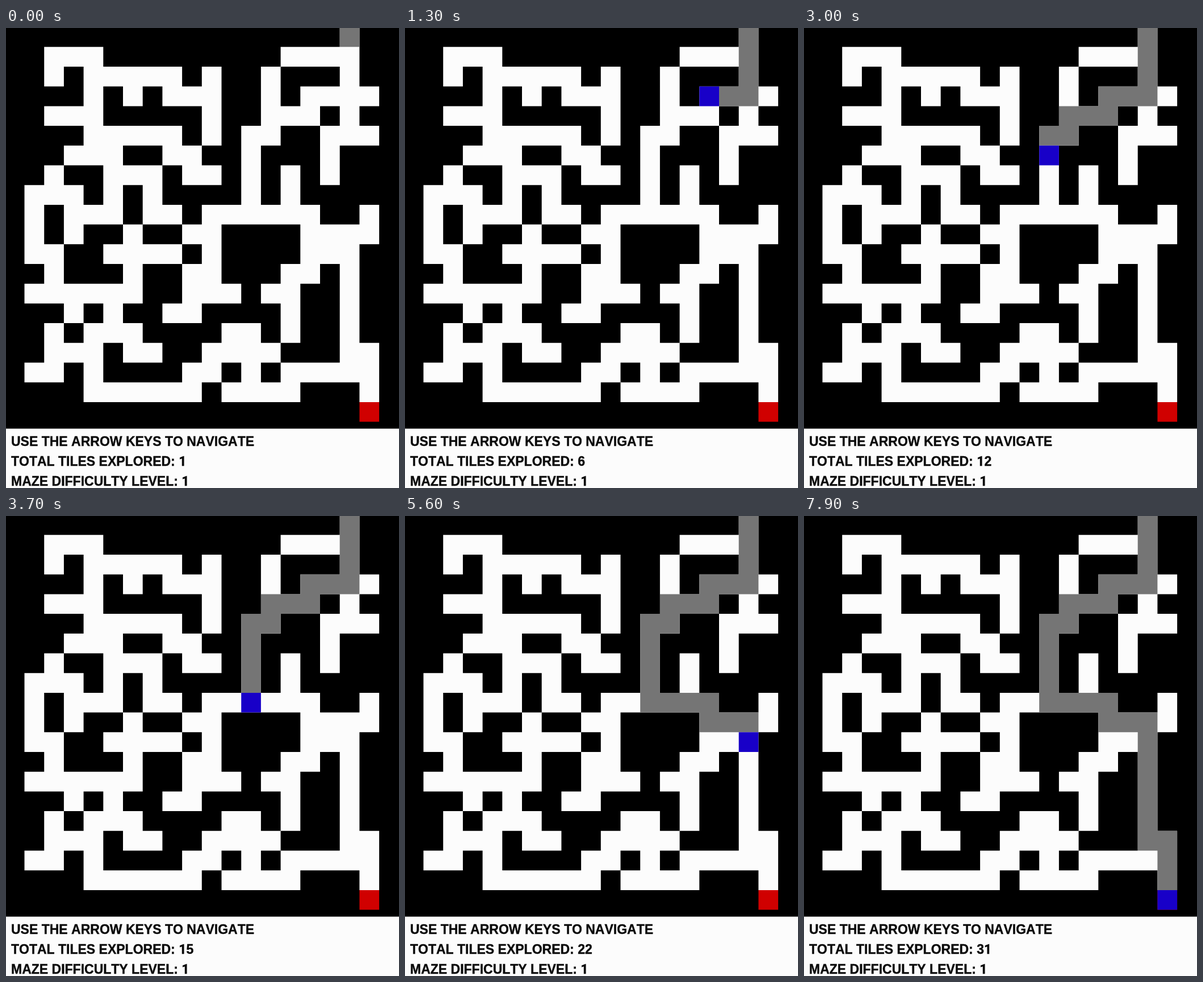
An HTML page for the animation above (8 s loop, 692x809 px).

```html
<!DOCTYPE html>
<html lang="en">
<head>
<meta charset="utf-8">
<title>Maze</title>
<style>
html, body { margin: 0; width: 100%; height: 100%; overflow: hidden; background: #000; }
svg { display: block; width: 692px; height: 809px; }
text {
  font: bold 23px "Liberation Sans", Arial, sans-serif; font-kerning: none;
  fill: #0a0a0a; stroke: #0a0a0a; stroke-width: .4px; white-space: pre;
}
.one { font-family: Roboto, "Liberation Sans", sans-serif; }
</style>
</head>
<body>
<svg viewBox="0 0 692 809">
  <rect width="692" height="809"/>
  <path id="floor" fill="#fcfcfc"/>
  <path id="goal" fill="#d00000"/>
  <path id="trail" fill="#757575"/>
  <path id="player" fill="#1800c8"/>
  <rect y="704.6" width="692" height="105" fill="#fcfcfc"/>
  <text x="9" y="735">USE THE ARROW KEYS TO NAVIGATE</text>
  <text x="9" y="770">TOTAL TILES EXPLORED: <tspan id="count"></tspan></text>
  <text x="9" y="805">MAZE DIFFICULTY LEVEL: <tspan class="one">1</tspan></text>
</svg>
<script>
const LOOP = 8000;

// Open columns per row, as ranges
const ROWS = [
  "17",
  "2-4 14-17",
  "2 4-8 10 13 17",
  "4 6 8-10 13 15-18",
  "2-4 10 13-15 17",
  "4-8 10 12-13 16-18",
  "3-5 8-9 12 16",
  "2 5-7 9-10 12 14 16",
  "1-3 5 7 12 14",
  "1 3-5 7-8 10-15 18",
  "1 3 6 9-10 15-18",
  "1-2 5-8 10 15-17",
  "2 6 9-10 14-15 17",
  "1-6 9-11 13-14 17",
  "3 5 8-9 14 17",
  "2 4-6 11-12 14 17",
  "2-4 6-7 10-13 17-18",
  "1-2 4 9-10 12 14-18",
  "4-9 11-14 18"
];

// Key presses and the moment of each, in tenths of a second
const MOVES = "DDDLLDLLDLDDDDRRRDRRDDDDDDRDDD";
const TIMES = [1, 4, 8, 10, 12, 19, 22, 25, 28, 29, 30, 31, 33, 35, 38,
  40, 43, 46, 49, 51, 54, 57, 60, 63, 65, 67, 69, 71, 74, 77];
const STEP = { D: [0, 1], L: [-1, 0], R: [1, 0] };

const el = id => document.getElementById(id);
const draw = (id, d) => el(id).setAttribute("d", d);
const colX = c => (34.7 * c - 2.2).toFixed(1);
const rowY = r => (34.7 * r - 1.4).toFixed(1);
const tiles = (a, b, r) =>
  `M${colX(a)} ${rowY(r)}H${colX(b + 1)}V${rowY(r + 1)}H${colX(a)}Z`;
const tile = ([c, r]) => tiles(c, c, r);

const path = [[17, 0]];
for (const key of MOVES) {
  const [c, r] = path[path.length - 1];
  path.push([c + STEP[key][0], r + STEP[key][1]]);
}

draw("floor", ROWS.map((row, r) => row.split(" ").map(run => {
  const [a, b = a] = run.split("-").map(Number);
  return tiles(a, b, r);
}).join("")).join(""));
draw("goal", tile(path[path.length - 1]));

let shown = -1;
function render(ms) {
  const n = TIMES.filter(t => t * 100 <= ms).length;
  if (n === shown) return;
  shown = n;
  draw("trail", path.slice(0, Math.max(n, 1)).map(tile).join(""));
  draw("player", n ? tile(path[n]) : "");
  el("count").innerHTML = String(n + 1).replace(/1/g, '<tspan class="one">1</tspan>');
}

let start = null;
function tick(now) {
  if (start === null) start = now;
  render((now - start) % LOOP);
  requestAnimationFrame(tick);
}
render(0);
requestAnimationFrame(tick);
</script>
</body>
</html>
```
